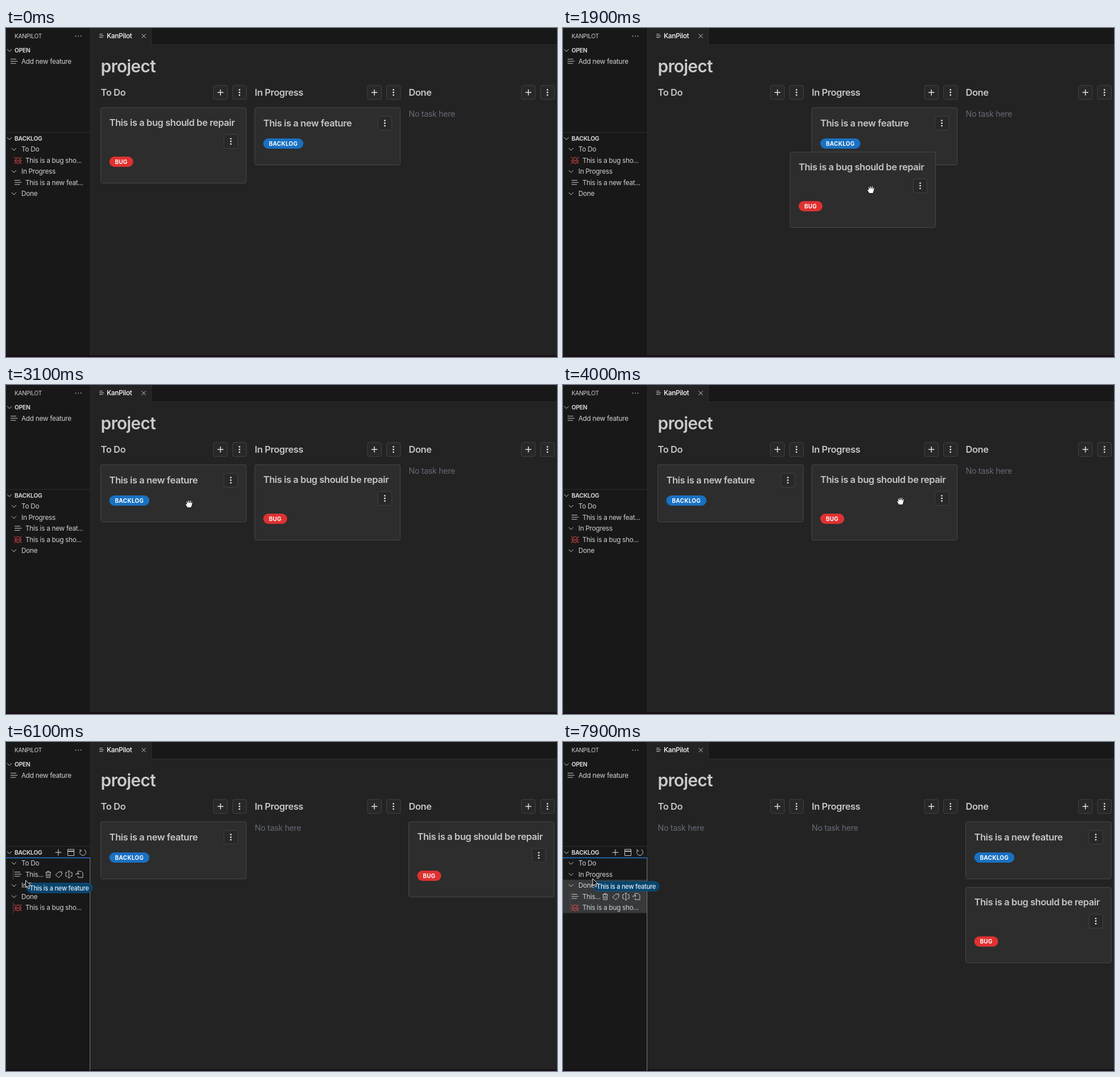
An HTML page that plays this animation: 968 by 578 pixels, repeating every 8000 ms.

```html
<!DOCTYPE html>
<html lang="en">
<head>
<meta charset="utf-8">
<title>Kanban board</title>
<style>
  html, body { margin: 0; width: 100%; height: 100%; overflow: hidden; background: #232323; }
  svg { display: block; width: 968px; height: 578px; }
  text { font: 400 11.8px Inter, "Open Sans", sans-serif; letter-spacing: -.024em; fill: #d0d0d0; white-space: pre; }
  .title { font-size: 29.8px; font-weight: 600; fill: #cacaca; }
  .head { font-size: 16.4px; font-weight: 600; fill: #c6c6c6; }
  .section { font-size: 10.3px; font-weight: 700; }
  .view { font-size: 10.1px; }
  .tab { font-weight: 500; fill: #fff; }
  .empty { font-size: 14.25px; fill: #666a77; }
  .badge { font-size: 9.8px; font-weight: 700; letter-spacing: .4px; fill: #fff; text-anchor: middle; }
  .ghost { font-size: 11.1px; font-weight: 500; fill: #e4eef6; }
  .line { fill: none; stroke: #c8c8c8; stroke-width: 1; }
  .bug { fill: none; stroke: #e5484d; stroke-width: 1; }
  .btn { fill: #282828; stroke: #424242; }
  .card { fill: #2d2d2d; stroke: #484848; }
</style>
</head>
<body>
<svg viewBox="0 0 968 578">
  <g id="frame"></g>
  <g id="board"></g>
  <g id="tree"></g>
  <g id="pointer"></g>
</svg>
<script>
const LOOP = 8000, STEP = 100;
const COLS = [166.5, 437, 707.5];
const NAMES = ['To Do', 'In Progress', 'Done'];
const CARDS = {
  feature: { title: 'This is a new feature', short: 'This is a new feat...', h: 101, base: 33, dots: 15,
             badge: 'BACKLOG', badgeY: 54, badgeW: 70.5, color: '#1971c2' },
  bug: { title: 'This is a bug should be repair', short: 'This is a bug sho...', h: 133, base: 32, dots: 47,
         badge: 'BUG', badgeY: 86, badgeW: 42, color: '#e03131' }
};

// Tracks: [time, x, y]; equal neighbouring times mark a jump.
const TRACKS = {
  bug: [[1400, 166.5, 140], [1600, 208, 84], [1800, 358, 174], [2000, 440, 262], [2200, 437, 255.5],
        [2600, 437, 255.5], [2900, 437, 140], [4000, 437, 140], [4500, 660, 174], [4600, 690, 160],
        [4800, 707, 140], [4900, 707.5, 140], [6700, 707.5, 140], [6700, 707.5, 255.5]],
  feature: [[2500, 437, 140], [2700, 350, 150], [2900, 185, 155], [3100, 166.5, 140],
            [6700, 166.5, 140], [6700, 707.5, 140]],
  pointer: [[100, 730, 278], [500, 330, 190], [900, 20, 68], [1200, 300, 200], [1400, 308, 206],
            [1600, 350, 150], [1800, 500, 240], [2000, 582, 328], [2200, 580, 300], [2500, 577, 196],
            [2700, 490, 206], [2900, 325, 211], [3200, 320, 208], [4000, 593, 204], [4500, 816, 238],
            [4600, 831, 226], [4800, 831, 220], [5000, 820, 222], [5700, 36, 234], [5900, 33, 238],
            [6000, 33, 238], [6100, 34.5, 243], [6400, 44, 264], [6600, 48, 272], [7000, 48, 272],
            [7400, 46, 266], [7700, 46, 266], [7800, 48, 258], [7900, 52, 240]]
};

// Tree order: numbers are columns, strings are cards.
const TREES = [
  [0, [0, 'bug', 1, 'feature', 2]],
  [2200, [0, 1, 'feature', 'bug', 2]],
  [3200, [0, 'feature', 1, 'bug', 2]],
  [5000, [0, 'feature', 1, 2, 'bug']],
  [6700, [0, 1, 2, 'feature', 'bug']]
];
const EMPTY = [[0, 2200, 2800], [0, 6700, LOOP], [1, 5000, LOOP], [2, 0, 4400]];

const $ = id => document.getElementById(id);
const within = (t, a, b) => t >= a && t < b;
const label = (x, y, s, cls = '') => `<text x="${x}" y="${y}" class="${cls}">${s}</text>`;
const rect = (x, y, w, h, attrs) => `<rect x="${x}" y="${y}" width="${w}" height="${h}" ${attrs}/>`;
const path = (d, cls = 'line') => `<path d="${d}" class="${cls}"/>`;
const at = (x, y, body) => `<g transform="translate(${x} ${y})">${body}</g>`;

function place(track, t) {
  let a = track[0];
  for (const b of track) {
    if (t < b[0]) {
      if (t <= a[0]) return a.slice(1);
      const p = (t - a[0]) / (b[0] - a[0]);
      return [a[1] + (b[1] - a[1]) * p, a[2] + (b[2] - a[2]) * p];
    }
    a = b;
  }
  return a.slice(1);
}

const chevron = (x, y) => path(`M${x - 4} ${y - 2}l4 4 4-4`);
const listIcon = (x, y) => at(x, y, path('M-6-4H4M-6-.3H6.3M-6 3.4H3.5'));
const bugIcon = (x, y) => at(x, y, path(
  'M-3.6-1.5a3.6 3.6 0 0 1 7.2 0V2a3.6 3.6 0 0 1-7.2 0ZM-2-1.2l4 4M2-1.2l-4 4' +
  'M-3.6-2.5L-6-4.5V-6M3.6-2.5L6-4.5V-6M-3.6.6H-6.8M3.6.6H6.8M-3.6 3L-6 4.5V6M3.6 3L6 4.5V6', 'bug'));
const plus = (x, y, r, w = 1) => `<path d="M${x - r} ${y}h${2 * r}M${x} ${y - r}v${2 * r}" class="line" style="stroke-width:${w};stroke:#e0e0e0"/>`;
const button = (x, y) => rect(x, y, 24.5, 24.5, 'rx="3" class="btn"');
const dots = (x, y) => button(x, y) + [-4.6, 0, 4.6].map(d =>
  `<circle cx="${x + 12.2}" cy="${y + 12.2 + d}" r="1.4" fill="#e4e4e4"/>`).join('');

function drawFrame() {
  const cols = COLS.map((x, i) =>
    label(x, 118.5, NAMES[i], 'head') +
    button(x + 198, 101) + plus(x + 210.2, 113.2, 5.2, 1.5) + dots(x + 231.5, 101)).join('');
  $('frame').innerHTML =
    rect(0, 0, 968, 578, 'fill="#232323"') +
    rect(0, 0, 148, 578, 'fill="#181818"') +
    rect(255, 0, 713, 29, 'fill="#181818"') +
    path('M148.5 0V578M255.5 0V29M255 29.5H968M0 183.5H148').replace('class', 'style="stroke:#2d2d2d" class') +
    label(15, 17.7, 'KANPILOT', 'view') +
    [122.5, 127, 131.5].map(x => `<circle cx="${x}" cy="14.3" r=".9" fill="#c8c8c8"/>`).join('') +
    chevron(6, 39.3) + label(15, 43, 'OPEN', 'section') +
    listIcon(14, 58.7) + label(27, 63.2, 'Add new feature') +
    chevron(6, 194.2) + label(15, 197.7, 'BACKLOG', 'section') +
    path('M164 10.8h6M164 13.7h8M164 16.6h6.5') +
    label(177, 18, 'KanPilot', 'tab') + path('M238.3 10.5l7.4 7.4M245.7 10.5l-7.4 7.4') +
    label(166.5, 78, 'project', 'title') + cols +
    rect(0, 575, 968, 3, 'fill="#190e14"');
}

function card(name, t) {
  const c = CARDS[name], [x, y] = place(TRACKS[name], t);
  return at(x, y,
    rect(0, 0, 255.5, c.h - .5, 'rx="3" class="card"') +
    label(15, c.base - .5, c.title, 'head') +
    dots(216.3, c.dots) +
    rect(15, c.badgeY, c.badgeW, 18, `rx="9" fill="${c.color}"`) +
    label(15 + c.badgeW / 2, c.badgeY + 12.5, c.badge, 'badge'));
}

function drawBoard(t) {
  const order = within(t, 2400, 3200) ? ['bug', 'feature'] : ['feature', 'bug'];
  $('board').innerHTML =
    EMPTY.filter(([, a, b]) => within(t, a, b)).map(([i]) => label(COLS[i], 155.5, 'No task here', 'empty')).join('') +
    order.map(name => card(name, t)).join('');
}

const rowActions = y => at(0, y,
  path('M69.5-3.5h9.5M72.5-3.5v-1.7h3.5v1.7M70.5-3.5l.5 9h6.5l.5-9M73-1v4.5M75.5-1v4.5') +
  path('M87 .8l6-5.3h5v5l-5.5 5.3zM95.6-2.4h.8') +
  path('M108-3.5h-3v7h3M113-3.5h3v7h-3M108.5-6h4M110.5-6v12M108.5 6h4') +
  path('M126.5-1.5v-4h5.5l3 3v8h-8.5v-2.5M123 1.2v-2.5h5M126.3-3.2l2 2-2 2'));
const headActions = () => plus(92, 194, 5.5) +
  path('M108.5 188.5h11v11h-11zM108.5 191.5h11M108.5 192.3h11') +
  path('M131 190.3a5.4 5.4 0 1 0 6.3-1.4M130.2 188.3v3h3.2');

function drawTree(t) {
  const rows = TREES.filter(([start]) => t >= start).pop()[1];
  const hover = t >= 5500;
  const lit = within(t, 6400, 6700) ? 262 : t >= 7800 ? 242 : 0;
  let out = lit ? rect(0, lit, 147, 300.5 - lit, 'fill="#37393b"') : '';
  rows.forEach((row, i) => {
    const y = 213 + i * 19.5;
    if (typeof row === 'number') {
      out += chevron(14, y) + label(27, y + 4.2, NAMES[row]);
      return;
    }
    const active = hover && row === 'feature';
    out += row === 'bug' ? bugIcon(21, y) : listIcon(21, y);
    out += label(34, y + 4.2, active ? 'This...' : CARDS[row].short);
    if (hover) out += `<path d="M12.5 ${y - 9.7}v19.5" stroke="#4a4a4a"/>`;
    if (active) out += rowActions(y);
  });
  if (hover) out += headActions();
  if (t >= 6100) out += '<path d="M147.5 203V578" stroke="#6c6f72"/><path d="M0 203.5H147.5" stroke="#2474cf" stroke-width="1.6"/>';
  $('tree').innerHTML = out;
}

const ARROW = '<path d="M0 0V12.6L3 10 5.1 14.8 7.2 13.8 5.2 9.3H9.2Z" fill="#111" stroke="#eee"/>';
const HAND = '<path d="M-3 6.5L-6.5 1Q-7-1-5-.8L-4 .5-5-4Q-4.5-6-3-5L-2-2V-6Q-1-7.5.2-6L.6-2 1.5-6Q3-7 3.6-5.4L3.3-1.5 4.5-4Q6-4.6 6.3-3L5 3 3.5 6.5Z" fill="#fff" stroke="#151515"/>';

function drawPointer(t) {
  if (t < 100) return void ($('pointer').innerHTML = '');
  const [x, y] = place(TRACKS.pointer, t);
  const dragging = within(t, 6100, 6700) || t >= 7800;
  const hand = within(t, 1200, 5100);
  const ghost = dragging
    ? rect(2, 5, 115, 17, 'rx="8.5" fill="#07446d" stroke="#0b5484"') + label(7, 17.5, CARDS.feature.title, 'ghost')
    : '';
  $('pointer').innerHTML = at(x, y, ghost + (hand ? HAND : ARROW));
}

let last = -1;
function tick(now) {
  const t = Math.floor(now % LOOP / STEP) * STEP;
  if (t !== last) {
    drawBoard(t);
    drawTree(t);
    drawPointer(t);
    last = t;
  }
  requestAnimationFrame(tick);
}

drawFrame();
const start = performance.now();
const run = () => tick(Math.max(0, performance.now() - start));
requestAnimationFrame(function loop() {
  const t = Math.floor((performance.now() - start) % LOOP / STEP) * STEP;
  if (t !== last) {
    drawBoard(t);
    drawTree(t);
    drawPointer(t);
    last = t;
  }
  requestAnimationFrame(loop);
});
</script>
</body>
</html>
```
